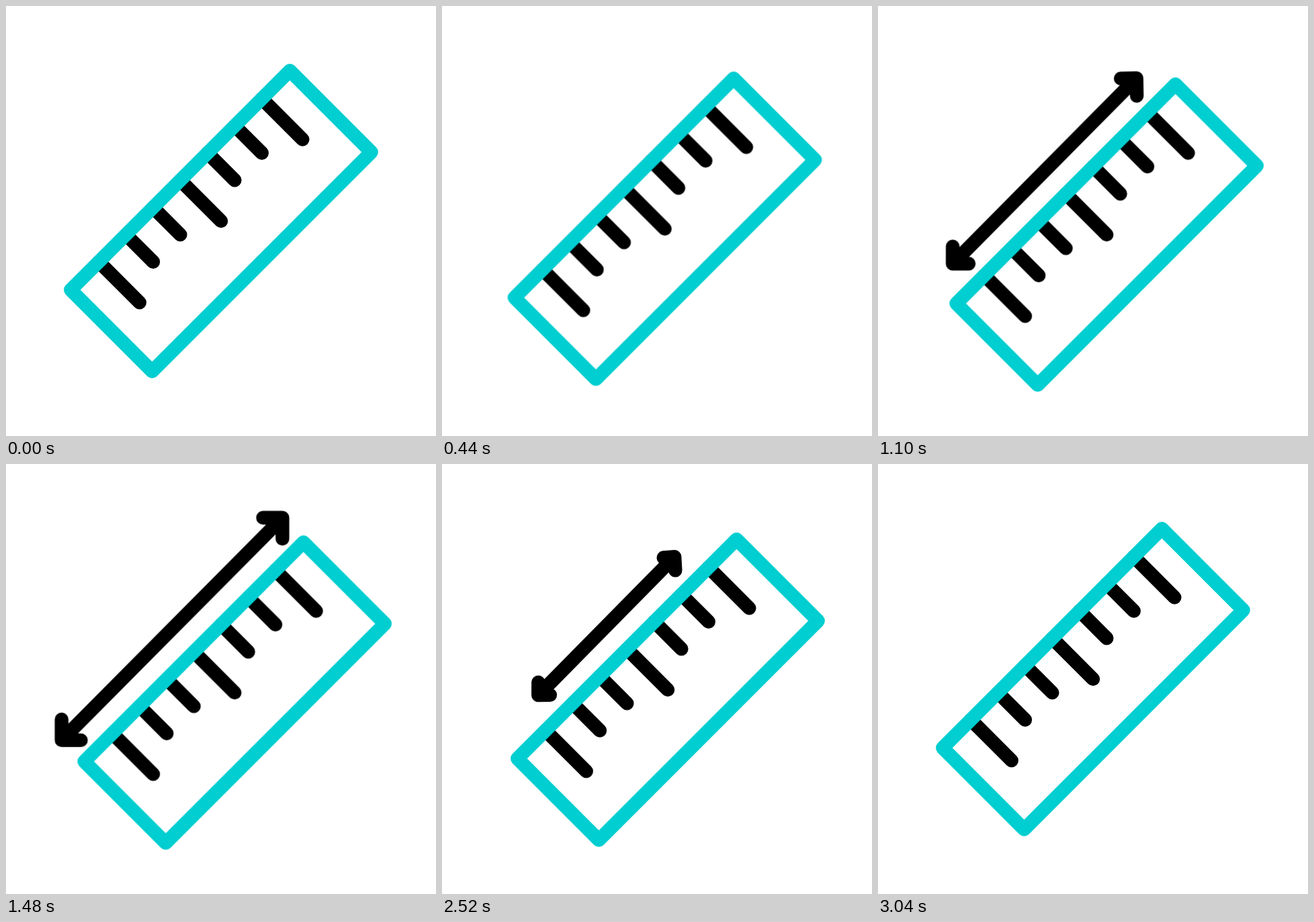
Animation, 640 px wide and 640 px high, one loop 3.6 s. Source, as an HTML page without scripts:

```html
<!DOCTYPE html>
<html lang="en">
<head>
<meta charset="utf-8">
<title>Ruler</title>
<style>
  html, body { margin: 0; width: 100%; height: 100%; overflow: hidden; background: #fff; }
  svg { display: block; width: 100%; height: 100%; }
  path { fill: none; stroke: #000; stroke-width: 20.4; stroke-linecap: round; stroke-linejoin: round; }
  .edge { stroke: #00ced1; }

  .ruler { animation: slide 3600ms infinite; }
  .arrow {
    --long: path("M82.7 411.1L411.4 80M382.5 80L411.4 80L411.4 111.3M82.7 380.2L82.7 411.1L111.5 411.1");
    --dot: path("M252 246.7L252 243M255.5 246.5L252 243L255 245.2M252.3 246.7L252 246.7L251.8 246.4");
    animation: stretch 3600ms infinite, show 3600ms step-end infinite;
  }

  @keyframes slide {
    0% { transform: translate(0, 0); animation-timing-function: cubic-bezier(.7, 0, .3, 1); }
    23.5%, 60.83% { transform: translate(20.2px, 20.2px); animation-timing-function: cubic-bezier(.7, 0, .3, 1); }
    84.44%, 100% { transform: translate(0, 0); }
  }
  @keyframes stretch {
    0%, 15% { d: var(--dot); animation-timing-function: cubic-bezier(.333, .667, .667, 1); }
    41.39%, 60.7% { d: var(--long); animation-timing-function: cubic-bezier(.333, 0, .833, .833); }
    78.75%, 100% { d: var(--dot); }
  }
  @keyframes show {
    0% { visibility: hidden; }
    15.1% { visibility: visible; }
    78.7%, 100% { visibility: hidden; }
  }
</style>
</head>
<body>
<svg viewBox="0 0 640 640">
  <g class="ruler">
    <path d="M380.8 138l60.6 60.6M340.4 178.4l40.4 40.4M300 218.8l40.4 40.4M259.5 259.5l60.6 60.6M219 300l40.4 40.4M178.6 340.4l40.4 40.4M138.2 380.8l60.6 60.6"/>
    <path class="edge" d="M422.5 96.3L543.7 217.5L217.5 543.7L96.3 422.5Z"/>
    <g transform="translate(-20.2 -20.2)">
      <path class="arrow"/>
    </g>
  </g>
</svg>
</body>
</html>
```
